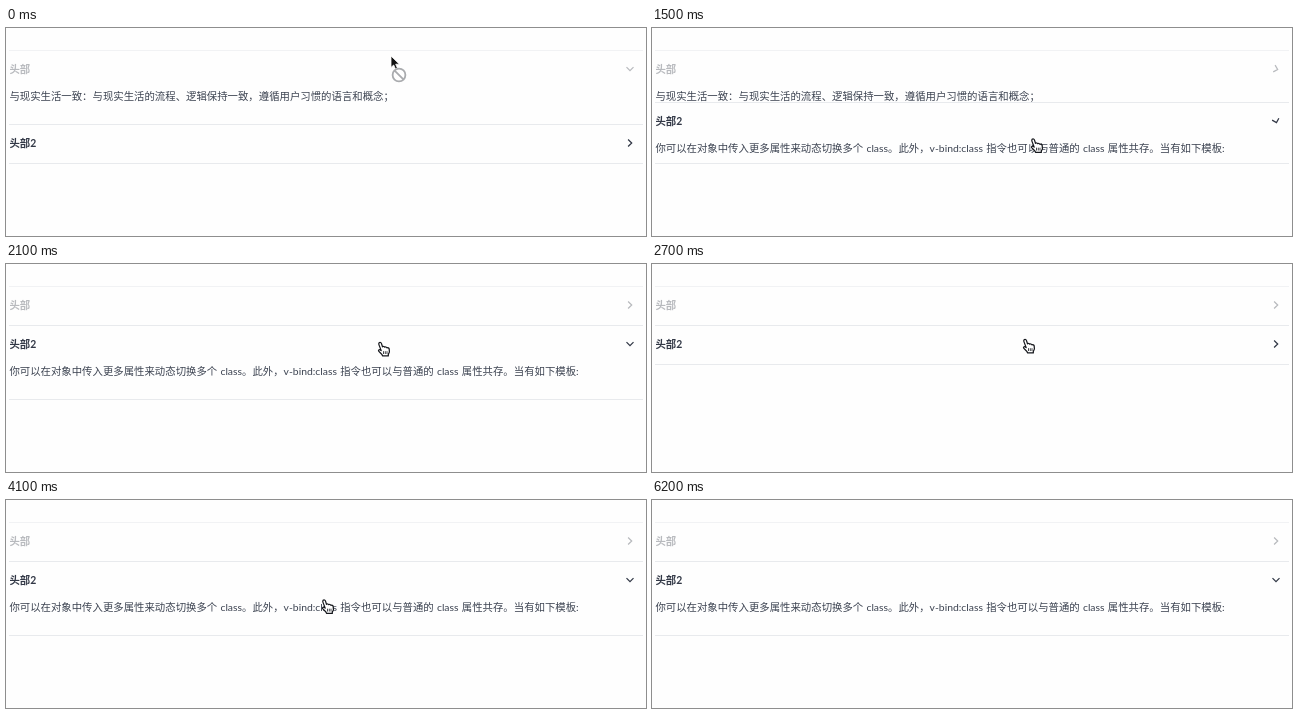
Write an HTML page that moves like this. It is 640x208 px and loops after 6.5 s.

```html
<!DOCTYPE html>
<html lang="zh-CN">
<head>
<meta charset="utf-8">
<title>折叠面板</title>
<style>
  html, body { margin: 0; width: 100%; height: 100%; overflow: hidden; background: #fefefe; }
  body { position: relative; font: 10.4px Lato, "Noto Sans CJK SC", "Noto Sans CJK", sans-serif; color: #3b4250; }
  .list { position: absolute; left: 3px; top: 22px; width: 634px; border-bottom: 1px solid #e8eaed; }
  .panel { border-top: 1px solid #e8eaed; text-indent: .4px; }
  .panel:first-child { border-color: #f1f2f4; }
  .head { position: relative; height: 38px; line-height: 36px; font-weight: 700; color: #323846; }
  .disabled { color: #b8babe; }
  .hover { color: #4b9fe0; }
  .head svg { position: absolute; left: 616.4px; top: 13px; }
  .body { overflow: hidden; height: 0; line-height: 15px; white-space: nowrap; word-spacing: .6px; }
  .chevron { fill: none; stroke: currentColor; stroke-width: 1.25; }
  #cursors { position: absolute; left: 0; top: 0; }
  #cursors > g { display: none; }
</style>
</head>
<body>
<div class="list">
  <div class="panel">
    <div class="head disabled">头部<svg width="10" height="10" viewBox="-5 -5 10 10"><polyline class="chevron" points="-1.9,-3.5 1.7,0 -1.9,3.5"/></svg></div>
    <div class="body">与现实生活一致：与现实生活的流程、逻辑保持一致，遵循用户习惯的语言和概念；</div>
  </div>
  <div class="panel">
    <div class="head">头部2<svg width="10" height="10" viewBox="-5 -5 10 10"><polyline class="chevron" points="-1.9,-3.5 1.7,0 -1.9,3.5"/></svg></div>
    <div class="body">你可以在对象中传入更多属性来动态切换多个 class。此外，v-bind:class 指令也可以与普通的 class 属性共存。当有如下模板:</div>
  </div>
</div>
<svg id="cursors" width="640" height="208">
  <g id="blocked">
    <path d="M0 0V11.4L2.7 9 4.4 13 6.4 12.1 4.7 8.2H8.4Z" fill="#111" stroke="#fff" stroke-width=".8"/>
    <g fill="#fff" stroke="#a9abae" stroke-width="1.8">
      <circle cx="8" cy="19" r="6.4"/>
      <line x1="3.6" y1="14.6" x2="12.4" y2="23.4"/>
    </g>
  </g>
  <g id="beam">
    <path d="M-2.6-5.4Q0-5.4 0-4 0-5.4 2.6-5.4M0-4V4M-2.6 5.4Q0 5.4 0 4 0 5.4 2.6 5.4M-1.3 1.8H1.3" fill="none" stroke="#222" stroke-width="1.1"/>
  </g>
  <g id="hand" stroke="#15171c" stroke-width="1.25" stroke-linejoin="round">
    <path fill="#fff" d="M-4.9-6.2c.9-.8 2-.3 2.4.8l1 3.2c.8-.6 1.8-.3 2.2.4.9-.5 1.8-.2 2.2.6 1-.4 2 .1 2.3 1.2.5 1.9.4 4-.9 5.5v1.4h-5.6c-.8-2-2.4-2.9-4-4.7-.6-.8.4-1.9 1.5-1.3l1 .7-2.3-6c-.2-.7-.2-1.3.2-1.8z"/>
    <path fill="none" stroke-width=".8" d="M-.5 2.2V5M1.3 2.2V5M3 2.2V5"/>
  </g>
</svg>
<script>
const LOOP = 6500, STEP = 100, SLIDE = 300, BODY_HEIGHT = 35;
const SWAP = 1325, CLOSE = 2360, REOPEN = 3210;

// time, x, y, cursor shape from this moment on
const route = [
  [0, 385, 28, 'blocked'], [100, 386, 38, 'blocked'], [200, 386, 80, 'beam'],
  [300, 386, 111, 'hand'], [500, 386, 111, 'hand'], [600, 385, 76, 'beam'],
  [700, 385, 32, 'blocked'], [800, 385, 72, 'beam'], [900, 385, 88, 'beam'],
  [1000, 385, 104, 'hand'], [1200, 385, 117.5, 'hand'], [1500, 385, 117.5, 'hand'],
  [1900, 379, 90, 'hand'], [2100, 378, 85, 'hand'], [2300, 377, 82, 'hand'],
  [3600, 377, 82, 'hand'], [4000, 323, 109, 'hand'], [4100, 322, 106.5, 'hand'],
  [4200, 375, 94, 'hand'], [4300, 468, 69.5, 'hand'], [4400, 468, 69.5, null]
];

const heads = document.querySelectorAll('.head');
const bodies = document.querySelectorAll('.body');
const chevrons = document.querySelectorAll('.chevron');
const cursors = document.querySelectorAll('#cursors > g');

const easeInOut = p => p * p * (3 - 2 * p);
const easeOut = p => 1 - (1 - p) ** 2;

function drawPanels(time, ease, apply) {
  const done = start => ease(Math.min(1, Math.max(0, (time - start) / SLIDE)));
  apply(0, 1 - done(SWAP));
  apply(1, done(SWAP) - done(CLOSE) + done(REOPEN));
}

function setHeight(index, open) {
  bodies[index].style.height = Math.round(open * BODY_HEIGHT) + 'px';
}

function turnChevron(index, open) {
  chevrons[index].setAttribute('transform', `rotate(${open * 90})`);
}

function drawCursor(time) {
  const i = route.findLastIndex(key => key[0] <= time);
  const [t0, x0, y0, shape] = route[i];
  const [t1, x1, y1] = route[i + 1] || [LOOP, x0, y0];
  const p = (time - t0) / (t1 - t0);
  for (const cursor of cursors) {
    cursor.style.display = cursor.id === shape ? 'inline' : 'none';
    cursor.setAttribute('transform', `translate(${x0 + (x1 - x0) * p} ${y0 + (y1 - y0) * p})`);
  }
}

function draw(time) {
  drawPanels(time, easeInOut, setHeight);
  drawPanels(time, easeOut, turnChevron);
  heads[0].classList.toggle('hover', time >= 700 && time < 1000);
  drawCursor(time);
}

const start = performance.now();
function tick() {
  const time = (performance.now() - start) % LOOP;
  draw(Math.floor(time / STEP) * STEP);
  requestAnimationFrame(tick);
}
tick();
</script>
</body>
</html>
```
